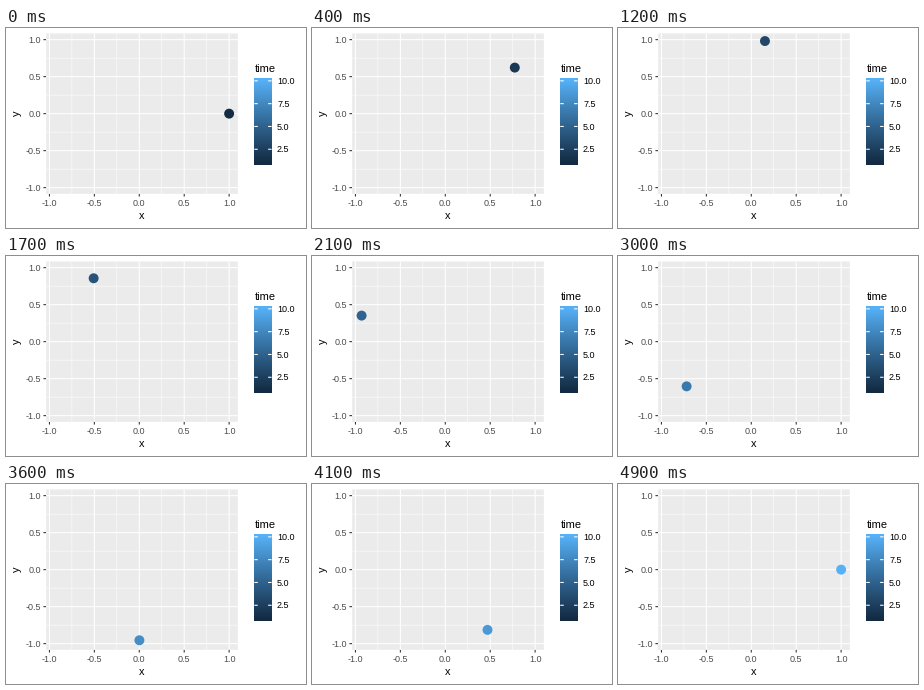
Animation, 300 px wide and 200 px high, one loop 5000 ms. Source, as a matplotlib script:

```python
import numpy as np
import matplotlib.pyplot as plt
from matplotlib.animation import FuncAnimation
from matplotlib.patches import Circle, Rectangle

WIDTH, HEIGHT, DPI = 300, 200, 100
FRAMES, INTERVAL = 50, 100
PX = 72 / DPI  # points per pixel

plt.rcParams["font.family"] = "Liberation Sans"

# Points on a circle, one per time step
N = 10
ANGLES = np.linspace(0, 2 * np.pi, N)
XS, YS = np.cos(ANGLES), np.sin(ANGLES)
KEYS = np.round(np.linspace(0, FRAMES - 1, N)).astype(int)

# Panel and colour bar, in pixels from the top left
LEFT, RIGHT, TOP, BOTTOM = 40.16, 231.84, 5.48, 165.8
BAR_X, BAR_W, BAR_H, BINS = 248.3, 17.28, 86.4, 20
BAR_TOP = 50.7
TICK, GAP, LINE = 2.74, 2.2, 1.07
RADIUS = 4.97

# sRGB <-> Lab
RGB_TO_XYZ = np.array([[0.4124564, 0.3575761, 0.1804375],
                       [0.2126729, 0.7151522, 0.0721750],
                       [0.0193339, 0.1191920, 0.9503041]])
WHITE = RGB_TO_XYZ.sum(axis=1)


def rgb_to_lab(rgb):
    rgb = np.asarray(rgb) / 255
    linear = np.where(rgb > 0.04045, ((rgb + 0.055) / 1.055) ** 2.4, rgb / 12.92)
    t = RGB_TO_XYZ @ linear / WHITE
    f = np.where(t > 0.008856, np.cbrt(t), 7.787 * t + 16 / 116)
    return np.array([116 * f[1] - 16, 500 * (f[0] - f[1]), 200 * (f[1] - f[2])])


def lab_to_rgb(lab):
    fy = (lab[0] + 16) / 116
    f = np.array([fy + lab[1] / 500, fy, fy - lab[2] / 200])
    t = np.where(f > 0.206893, f ** 3, (f - 16 / 116) / 7.787)
    linear = np.clip(np.linalg.solve(RGB_TO_XYZ, t * WHITE), 0, 1)
    rgb = np.where(linear > 0.0031308,
                   1.055 * linear ** (1 / 2.4) - 0.055, 12.92 * linear)
    return np.clip(rgb, 0, 1)


LOW, HIGH = rgb_to_lab([0x13, 0x2B, 0x43]), rgb_to_lab([0x56, 0xB1, 0xF7])


def gradient(u):
    return lab_to_rgb(LOW + (HIGH - LOW) * u)


def make_scale(values, start, end):
    """Map data to pixels, with 5% padding on both sides."""
    low, high = values.min(), values.max()
    pad = 0.05 * (high - low)
    return lambda v: start + (v - low + pad) / (high - low + 2 * pad) * (end - start)


to_x = make_scale(XS, LEFT, RIGHT)
to_y = make_scale(YS, BOTTOM, TOP)

fig = plt.figure(figsize=(WIDTH / DPI, HEIGHT / DPI), dpi=DPI, facecolor="white")
ax = fig.add_axes([0, 0, 1, 1])
ax.axis("off")


def line(xs, ys, color, width=LINE, z=2):
    ax.plot(xs, ys, color=color, lw=width * PX, solid_capstyle="butt",
            snap=False, zorder=z)


def label(x, y, text, size=9, color="black", **kwargs):
    ax.text(x, y, text, fontsize=size * PX, color=color, va="baseline", **kwargs)


def draw_panel():
    ax.add_patch(Rectangle((LEFT, TOP), RIGHT - LEFT, BOTTOM - TOP,
                           fc="#EBEBEB", lw=0, snap=False, zorder=1))
    for v in np.arange(-0.75, 1, 0.5):
        line([LEFT, RIGHT], [to_y(v)] * 2, "white", LINE / 2)
        line([to_x(v)] * 2, [TOP, BOTTOM], "white", LINE / 2)
    for v in np.arange(-1, 1.1, 0.5):
        x, y = to_x(v), to_y(v)
        line([LEFT, RIGHT], [y, y], "white", z=3)
        line([x, x], [TOP, BOTTOM], "white", z=3)
        line([LEFT - TICK, LEFT], [y, y], "#333333")
        line([x, x], [BOTTOM, BOTTOM + TICK], "#333333")
        label(LEFT - TICK - GAP, y + 3.2, f"{v:.1f}", color="#4D4D4D", ha="right")
        label(x, 178, f"{v:.1f}", color="#4D4D4D", ha="center")
    label((LEFT + RIGHT) / 2, 191, "x", 11, ha="center")
    ax.text(13.5, (TOP + BOTTOM) / 2, "y", fontsize=11 * PX, rotation=90,
            ha="right", va="center", rotation_mode="default",
            transform=ax.transData + shift_right(2.3))


def shift_right(pixels):
    from matplotlib.transforms import Affine2D
    return Affine2D().translate(pixels, 0)


def draw_legend():
    label(BAR_X, 44, "time", 11, ha="left")
    bins = np.array([gradient(u) for u in np.linspace(0, 1, BINS)])
    ax.imshow(np.repeat(bins[:, None], 2, axis=1), origin="lower", aspect="auto",
              extent=(BAR_X, BAR_X + BAR_W, BAR_TOP + BAR_H, BAR_TOP),
              interpolation="bilinear", zorder=2)
    half_bin = BAR_H / BINS / 2
    for v in (2.5, 5, 7.5, 10):
        y = BAR_TOP + half_bin + (10 - v) / 9 * (BAR_H - 2 * half_bin)
        for x in (BAR_X, BAR_X + BAR_W * 0.8):
            line([x, x + BAR_W / 5], [y, y], "white", z=3)
        label(BAR_X + BAR_W + 5.48, y + 3.2, f"{v:.1f}", ha="left")


def cubic_in_out(p):
    return 4 * p ** 3 if p < 0.5 else 1 - 4 * (1 - p) ** 3


ax.set_xlim(0, WIDTH)
ax.set_ylim(HEIGHT, 0)
draw_panel()
draw_legend()
ax.set_xlim(0, WIDTH)
ax.set_ylim(HEIGHT, 0)

dot = ax.add_patch(Circle((0, 0), RADIUS, lw=0, zorder=5))


def update(frame):
    k = min(np.searchsorted(KEYS, frame, side="right") - 1, N - 2)
    p = cubic_in_out((frame - KEYS[k]) / (KEYS[k + 1] - KEYS[k]))
    x = XS[k] + (XS[k + 1] - XS[k]) * p
    y = YS[k] + (YS[k + 1] - YS[k]) * p
    dot.center = to_x(x), to_y(y)
    dot.set_facecolor(gradient((k + p) / (N - 1)))
    return [dot]


animation = FuncAnimation(fig, update, frames=FRAMES, interval=INTERVAL,
                          repeat=True, repeat_delay=0)
plt.show()
```
